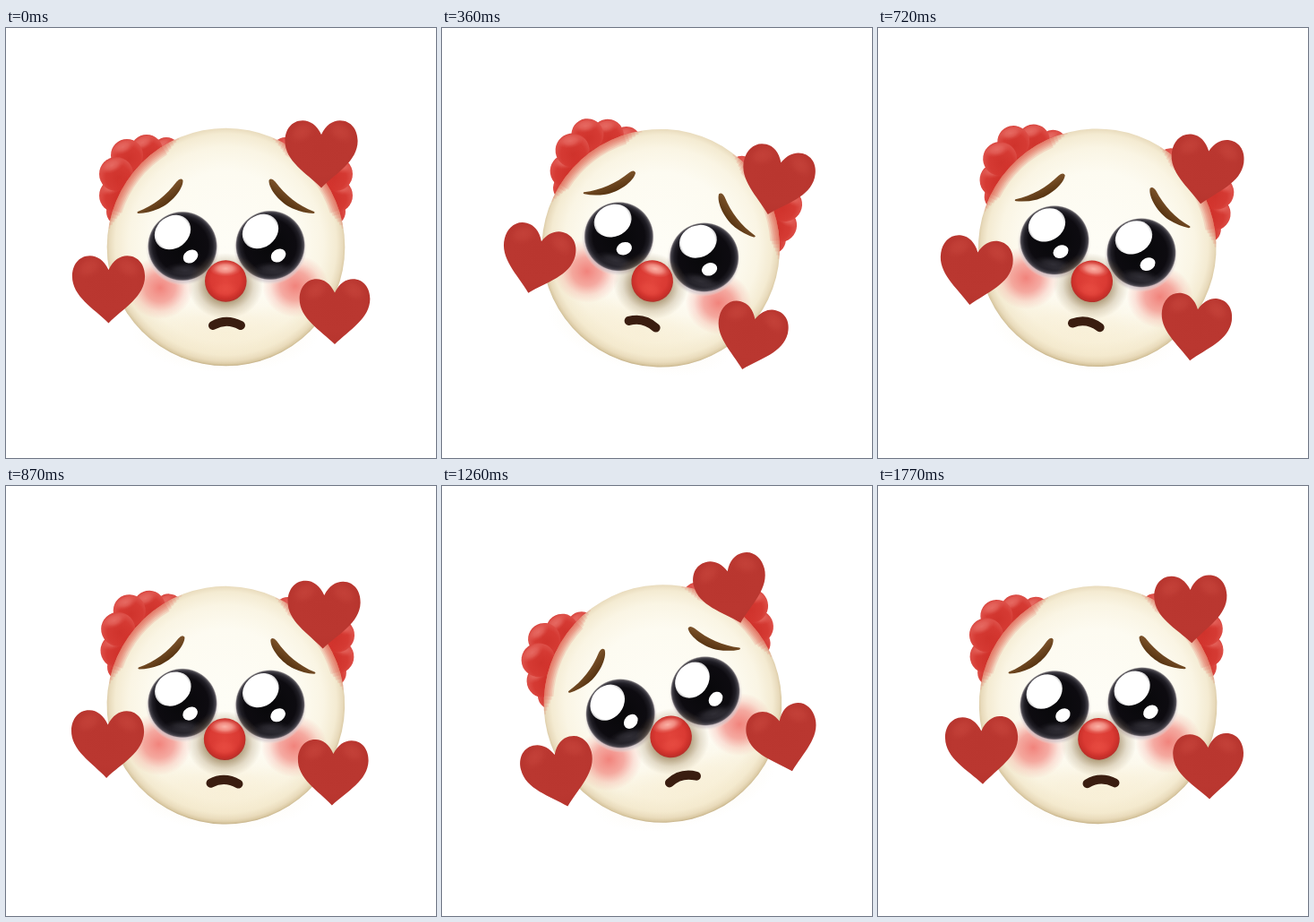
An HTML page with a canvas for the animation above (1800 ms loop, 480 by 480 pixels).

```html
<!DOCTYPE html>
<html lang="en">
<head>
<meta charset="utf-8">
<title>Swaying clown</title>
<style>
  html, body { margin: 0; width: 100%; height: 100%; overflow: hidden; background: #fff; }
  canvas { display: block; width: 480px; height: 480px; }
</style>
</head>
<body>
<canvas id="stage" width="480" height="480"></canvas>
<script>
const ctx = document.getElementById('stage').getContext('2d');
const LOOP = 1800, STEP = 30, SWING = 15 * Math.PI / 180;
const FACE = { x: 245.5, y: 244.5, r: 132.8 };

function radial(x, y, r0, r1, stops) {
  const g = ctx.createRadialGradient(x, y, r0, x, y, r1);
  stops.forEach(([at, color]) => g.addColorStop(at, color));
  return g;
}

function oval(x, y, rx, ry, fill, turn = 0) {
  ctx.beginPath();
  ctx.ellipse(x, y, rx, ry, turn, 0, Math.PI * 2);
  ctx.fillStyle = fill;
  ctx.fill();
}

function disc(x, y, r, fill) { oval(x, y, r, r, fill); }

// Soft spot that fades to nothing at its rim
function glow(x, y, rx, ry, rgb, alpha, turn = 0) {
  ctx.save();
  ctx.translate(x, y);
  ctx.rotate(turn);
  ctx.scale(rx, ry);
  disc(0, 0, 1, radial(0, 0, 0, 1, [
    [0, `rgba(${rgb},${alpha})`],
    [0.45, `rgba(${rgb},${alpha * 0.68})`],
    [0.75, `rgba(${rgb},${alpha * 0.22})`],
    [1, `rgba(${rgb},0)`]
  ]));
  ctx.restore();
}

// Runs draw as is and again flipped about the vertical axis x
function mirrored(axis, draw) {
  draw();
  ctx.save();
  ctx.translate(axis * 2, 0);
  ctx.scale(-1, 1);
  draw();
  ctx.restore();
}

function curl(x, y, r) {
  disc(x, y, r, radial(x + 2, y + 4, 0, r + 4, [
    [0, '#cf332c'], [0.6, '#d53a33'], [0.9, '#dd4f48'], [1, '#d8453e']
  ]));
  glow(x - r * 0.25, y - r * 0.5, r * 0.75, r * 0.42, '242,140,132', 0.55, -0.4);
}

function hair() {
  disc(145, 172, 32, '#d0342d');
  curl(128, 205, 16);
  curl(179, 138, 16);
  curl(123, 187, 19);
  curl(157, 137, 18);
  curl(135, 142, 18);
  curl(123, 163, 19);
  glow(138, 192, 22, 36, '208,44,38', 0.8);
}

function face() {
  const { x, y, r } = FACE;
  disc(x, y, r, radial(x, y - 3, 0, r + 3, [
    [0, '#fefdf6'], [0.6, '#fdfbf1'], [0.8, '#faf5e4'],
    [0.91, '#f4ebd2'], [0.96, '#e8dabb'], [0.985, '#d9c8a2'], [1, '#c2ae84']
  ]));
  glow(x, y + 95, 105, 45, '244,228,190', 0.4);
  ctx.save();
  ctx.beginPath();
  ctx.arc(x, y, r, 0, Math.PI * 2);
  ctx.clip();
  mirrored(x, () => {
    ctx.strokeStyle = 'rgba(222,60,50,0.13)';
    for (let i = 1; i <= 6; i++) {
      ctx.lineWidth = i * 3.5;
      ctx.beginPath();
      ctx.arc(x, y, r, Math.PI * (1.04 + i * 0.01), Math.PI * (1.38 - i * 0.01));
      ctx.stroke();
    }
  });
  ctx.restore();
}

function eye(x, y) {
  disc(x, y + 3, 41, radial(x, y + 3, 33, 41, [
    [0, 'rgba(186,176,186,0.9)'], [0.6, 'rgba(212,204,208,0.65)'], [1, 'rgba(232,226,222,0)']
  ]));
  disc(x, y, 39, radial(x, y, 0, 39, [
    [0, '#08080a'], [0.74, '#0d0b10'], [0.86, '#1f1d24'],
    [0.93, '#3a3840'], [0.965, 'rgba(64,60,68,0.8)'], [1, 'rgba(110,104,112,0)']
  ]));
  glow(x + 3, y + 27, 24, 9, '84,82,92', 0.5);
  oval(x - 11, y - 15.5, 21.5, 17.8, radial(x - 11, y - 15.5, 0, 21.5, [
    [0, '#fff'], [0.88, '#fff'], [1, 'rgba(255,255,255,0.75)']
  ]), -0.65);
  oval(x + 9, y + 11.5, 8.8, 7, '#fff', -0.6);
}

function brow() {
  ctx.beginPath();
  ctx.moveTo(147, 205);
  ctx.bezierCurveTo(165, 198, 179, 187, 190.5, 171.5);
  ctx.quadraticCurveTo(195, 166.5, 197.5, 170);
  ctx.bezierCurveTo(198, 180, 184, 196, 171, 201.5);
  ctx.quadraticCurveTo(159, 206.5, 148, 207);
  ctx.quadraticCurveTo(145.5, 206.5, 147, 205);
  const g = ctx.createLinearGradient(167, 183, 178, 199);
  g.addColorStop(0, '#855a30');
  g.addColorStop(1, '#54310f');
  ctx.fillStyle = g;
  ctx.fill();
}

function nose() {
  glow(245, 288, 42, 37, '128,98,50', 0.95);
  disc(245.3, 282.5, 23.3, radial(245, 281, 0, 25, [
    [0, '#e2443b'], [0.65, '#da3a33'], [0.86, '#cb302a'], [1, '#b2302a']
  ]));
  glow(245, 292, 16, 10, '240,86,74', 0.5);
  glow(245, 268.5, 18, 9, '255,190,178', 0.9);
}

function mouth() {
  ctx.beginPath();
  ctx.moveTo(231, 332);
  ctx.quadraticCurveTo(246, 323.5, 262, 332);
  ctx.lineCap = 'round';
  ctx.lineWidth = 10;
  ctx.strokeStyle = '#3a1d10';
  ctx.stroke();
}

// x, y is the notch between the lobes
function heart(x, y, size) {
  ctx.save();
  ctx.translate(x, y);
  ctx.scale(size, size);
  ctx.beginPath();
  ctx.moveTo(0, 0);
  ctx.bezierCurveTo(-5, -11, -13, -16, -21, -16);
  ctx.bezierCurveTo(-34, -16, -41, -5, -41, 7);
  ctx.bezierCurveTo(-41, 30, -17, 43, 0, 60);
  ctx.bezierCurveTo(17, 43, 41, 30, 41, 7);
  ctx.bezierCurveTo(41, -5, 34, -16, 21, -16);
  ctx.bezierCurveTo(13, -16, 5, -11, 0, 0);
  ctx.closePath();
  ctx.fillStyle = radial(0, 14, 0, 52, [
    [0, '#b9362f'], [0.6, '#ba3730'], [0.85, '#b7352e'], [1, '#a92e27']
  ]);
  ctx.fill();
  mirrored(0, () => glow(-22, -3, 17, 12, '206,76,66', 0.45, -0.5));
  ctx.restore();
}

function draw(angle) {
  ctx.fillStyle = '#fff';
  ctx.fillRect(0, 0, 480, 480);
  ctx.save();
  ctx.translate(240, 240);
  ctx.rotate(angle);
  ctx.translate(-240, -240);
  mirrored(FACE.x, hair);
  face();
  glow(172, 290, 37, 35, '238,98,92', 0.78);
  glow(323, 288, 37, 35, '238,98,92', 0.78);
  eye(197, 243.5);
  eye(295, 242.5);
  nose();
  mirrored(245.5, brow);
  mouth();
  heart(114.5, 270, 0.99);
  heart(352, 119, 0.99);
  heart(367, 295.5, 0.96);
  ctx.restore();
}

function tick() {
  const t = Math.floor((performance.now() % LOOP) / STEP) * STEP;
  draw(SWING * Math.sin(t / LOOP * Math.PI * 2));
  requestAnimationFrame(tick);
}
tick();
</script>
</body>
</html>
```
